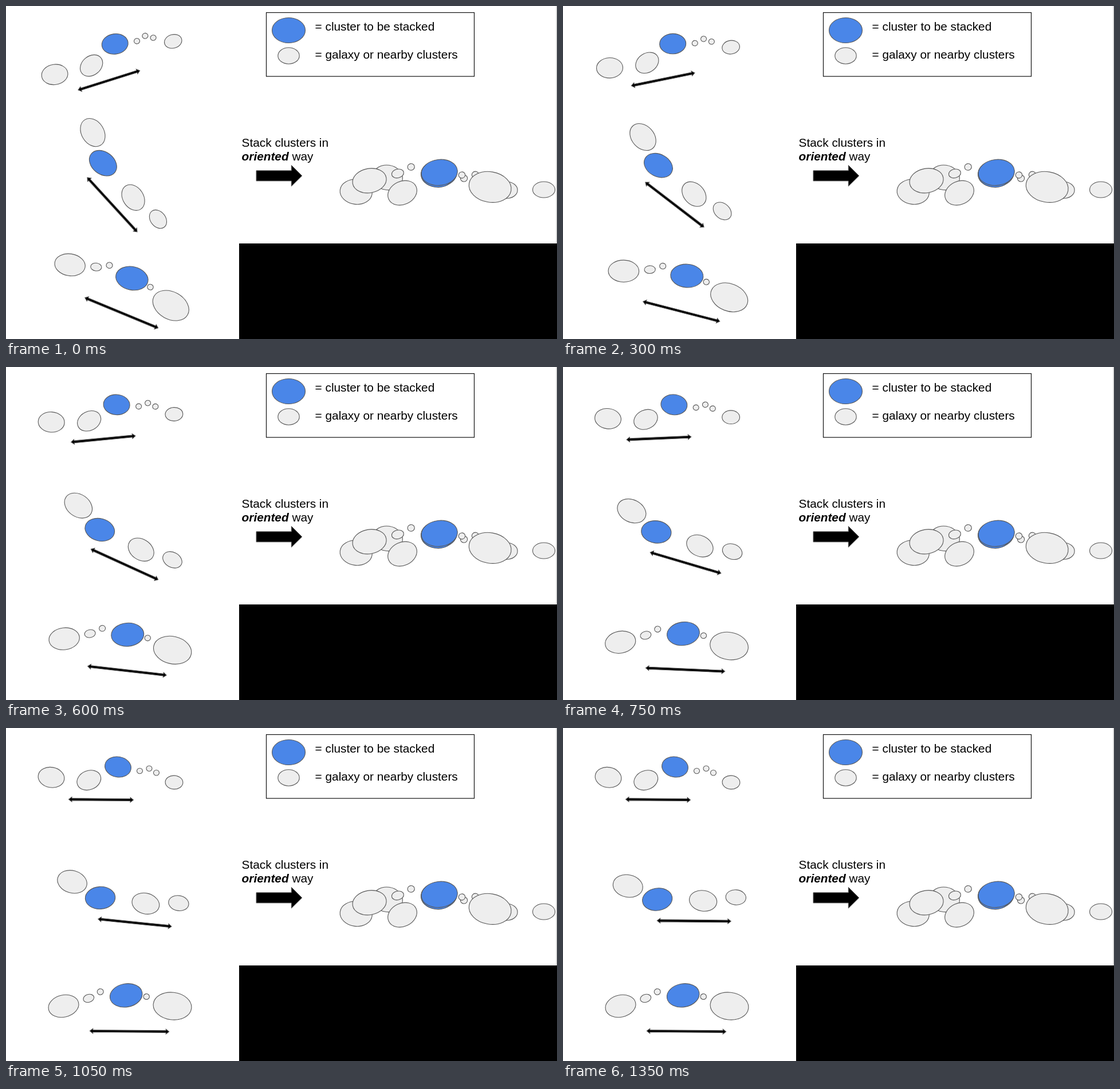
These frames come from a looping animation (962x582 px, 1.8 s). An HTML page:

```html
<!DOCTYPE html>
<html lang="en">
<head>
<meta charset="utf-8">
<title>Oriented stacking</title>
<style>
  html, body { margin: 0; width: 100%; height: 100%; overflow: hidden; background: #fff; }
  svg { display: block; }
  text { font: 20.8px "Liberation Sans", Arial, sans-serif; }
  ellipse { fill: #eee; stroke: #595959; stroke-width: 1.1; vector-effect: non-scaling-stroke; }
  ellipse.main { fill: #4a86e8; }
  .arrow { stroke: #595959; stroke-width: 1; }
</style>
</head>
<body>
<svg id="stage" width="962" height="582" viewBox="0 0 962 582">
  <rect x="960.5" width="1.5" height="415" fill="#ccc"/>
  <rect x="407" y="415" width="555" height="167"/>
  <rect x="454.5" y="11.5" width="363" height="111.5" fill="#fff" stroke="#111" stroke-width="1.2"/>
  <text x="539.6" y="43">= cluster to be stacked</text>
  <text x="539.6" y="92">= galaxy or nearby clusters</text>
  <text x="411.6" y="246">Stack clusters in</text>
  <text x="411.6" y="270"><tspan font-weight="bold" font-style="italic">oriented</tspan> way</text>
  <path class="arrow" d="M437 287.7H498.3V278.3L516.8 296.7L498.3 315V305.8H437Z"/>
</svg>
<script>
const STEP = 150, LOOP = 1800, LAST = 8, SETTLE = 6;
const stage = document.getElementById('stage');

function add(parent, tag, attrs = {}) {
  const el = document.createElementNS('http://www.w3.org/2000/svg', tag);
  for (const key in attrs) el.setAttribute(key, attrs[key]);
  return parent.appendChild(el);
}

function oval(parent, cx, cy, rx, tilt, flat, type = '') {
  add(parent, 'ellipse', {
    cx, cy, rx, ry: rx * flat, class: type,
    transform: `rotate(${tilt} ${cx} ${cy})`
  });
}

function doubleArrow(parent, x, y, length) {
  const end = length - 5.5;
  add(parent, 'path', {
    class: 'arrow',
    d: `M0 0L5.5 -4.3V-1.9H${end}V-4.3L${length} 0L${end} 4.3V1.9H5.5V4.3Z`,
    transform: `translate(${x} ${y}) rotate(.5)`
  });
}

// Positions are relative to the main cluster, in the level pose.
// turns: [step, degrees] keys; blobs: x, y, radius, tilt; small beads are rounder.
const groups = [
  {
    center: [195.5, 68], pivot: [-.7, 14.1], shift: [-.9, -2.1],
    turns: [[0, -18], [SETTLE, 0]],
    main: [23, 10], flat: .77, arrow: [-86, 56.7, 113],
    blobs: [
      [-116.5, 18.3, 23, 10], [-50.7, 23.2, 21.5, -22],
      [38, 7, 5, 0], [54.5, 2.8, 5, 0], [67, 10.3, 5, 0], [98, 27, 15.4, 3]
    ],
    stacked: 'translate(752.6 295) rotate(-3) scale(1.225)'
  },
  {
    center: [164.7, 299.5], pivot: [28.1, -2.8], shift: [-2.2, -3.4],
    turns: [[0, 47], [3, 32], [5, 16], [LAST, 0]],
    main: [26.2, -9], flat: .745, arrow: [-.4, 37.2, 129],
    blobs: [[-51.4, -23.4, 26.2, 11], [79.9, 2.5, 24.2, 10], [137.1, -3.5, 17.7, 5]]
  },
  {
    center: [209.7, 467.3], pivot: [-21.75, 33.8], shift: [-.9, -2],
    turns: [[0, 22], [5, 2], [SETTLE, 0]],
    main: [28.5, -10], flat: .715, arrow: [-63.4, 62.2, 138.4],
    blobs: [
      [-109.2, 18.7, 26.8, -13], [-65.4, 5.1, 9.6, -16], [-45, -6.3, 5.5, -13],
      [35.5, 2.2, 5.2, -10], [80.8, 18.7, 33.5, 7]
    ],
    stacked: 'translate(756.7 290.9) rotate(3) scale(1.11)'
  }
];

function addCluster(parent, { main: [radius, tilt], flat, blobs }) {
  oval(parent, 0, 0, radius, tilt, flat, 'main');
  for (const [x, y, r, t] of blobs) oval(parent, x, y, r, t, r < 6 ? .95 : flat);
}

// Legend samples
oval(stage, 493.5, 42.5, 29, 0, .76, 'main');
oval(stage, 493.5, 87, 18.7, 0, .76);

// Stacked result: the middle cluster is spread out, the others are scaled copies
oval(stage, 666, 299.8, 26.5, 8, .82);
oval(stage, 939, 321, 19.5, 0, .72);
oval(stage, 756, 294, 31, -6, .71, 'main');

for (const group of groups) {
  group.el = add(stage, 'g');
  addCluster(group.el, group);
  doubleArrow(group.el, ...group.arrow);
  if (group.stacked) addCluster(add(stage, 'g', { transform: group.stacked }), group);
}

function turnAt(keys, step) {
  const next = keys.findIndex(([at]) => at > step);
  if (next < 0) return 0;
  const [[from, a], [to, b]] = [keys[next - 1], keys[next]];
  return a + (b - a) * (step - from) / (to - from);
}

function draw(now) {
  const step = Math.min(LAST, Math.floor(now % LOOP / STEP));
  for (const { el, center, pivot, shift, turns } of groups) {
    const [x, y] = center.map((c, i) => step < SETTLE ? c + shift[i] : c);
    el.setAttribute('transform', `translate(${x} ${y}) rotate(${turnAt(turns, step)} ${pivot})`);
  }
}

const start = performance.now();
function tick() {
  draw(performance.now() - start);
  requestAnimationFrame(tick);
}
tick();
</script>
</body>
</html>
```
